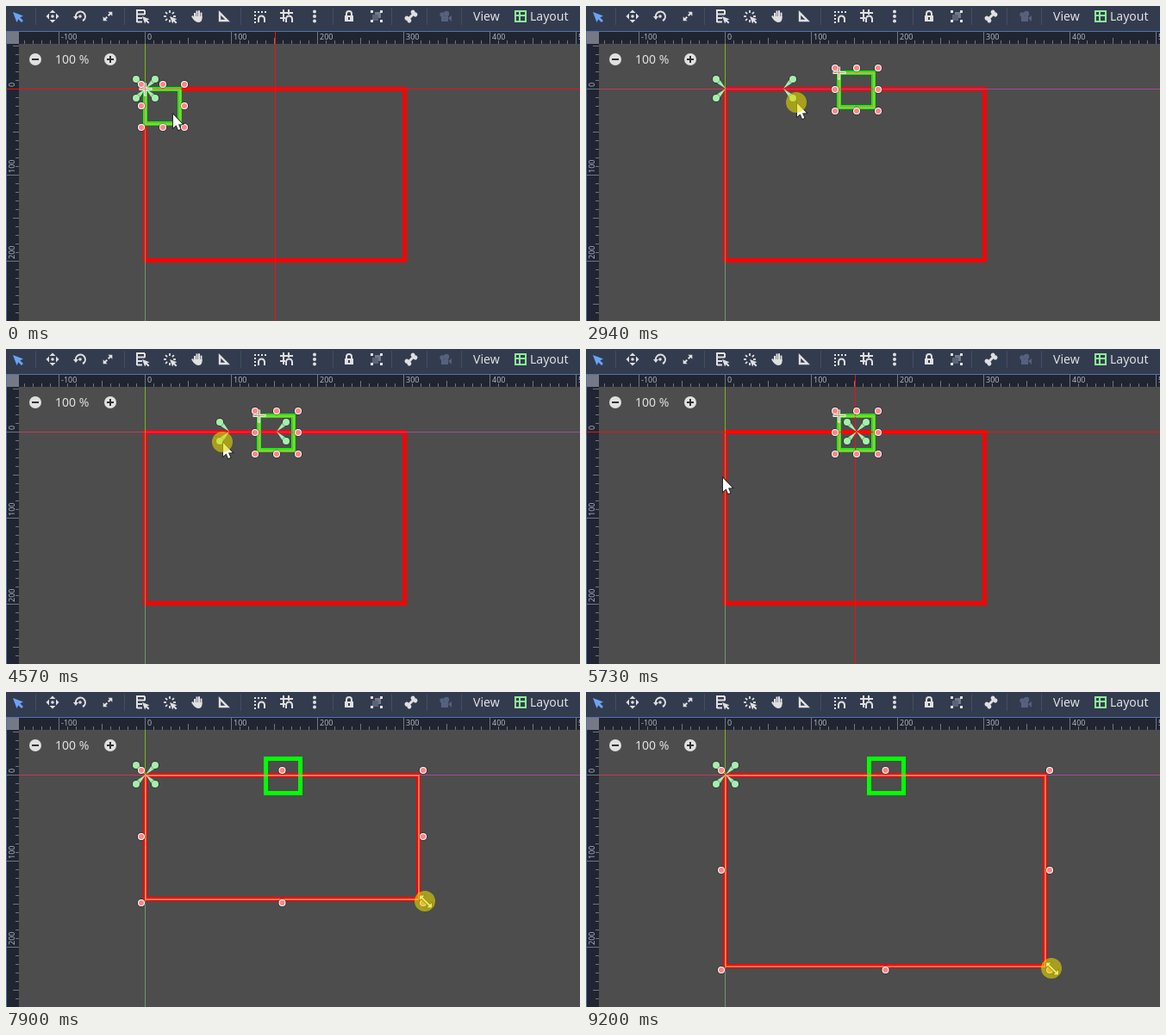
An HTML page with a canvas for the animation above (9300 ms loop, 666 px wide and 366 px high).

```html
<!DOCTYPE html>
<html lang="en">
<head>
<meta charset="utf-8">
<title>Anchor editing</title>
<style>
html, body { margin: 0; width: 100%; height: 100%; overflow: hidden; background: #4d4d4d; }
canvas { display: block; }
</style>
</head>
<body>
<canvas id="stage" width="666" height="366"></canvas>
<script>
const ctx = document.getElementById('stage').getContext('2d');
const W = 666, H = 366, LOOP = 9300, STEP = 76.7;
const ORIGIN = { x: 161.5, y: 96.5 };
const LIGHT = '#e0e0e0', DIM = '#56617f', PIN = '#a5efac';

// Pointer moves: start, end, target x, target y. The pointer rests in between.
const MOVES = [
  [80, 150, 187, 122],
  [860, 1320, 306, 106], [1390, 1470, 322, 104],
  [1780, 1930, 319, 103],
  [2250, 2560, 174, 108],
  [2790, 2940, 245, 113], [3020, 3330, 328, 109],
  [3630, 3940, 155, 110],
  [4110, 4870, 308, 109],
  [5420, 6200, -20, 200],
  [6500, 6810, 463, 299],
  [7040, 7200, 471, 299],
  [7520, 7900, 487, 244], [7980, 8440, 526, 338],
  [8510, 9200, 541, 322]
];
const PRESSES = [[860, 2250], [2790, 3630], [4110, 5270], [7350, LOOP]];

const clamp = (v, lo, hi) => Math.max(lo, Math.min(hi, v));
const within = (t, a, b) => t >= a && t < b;

function pointer(t) {
  let x = 194, y = 126;
  for (const [start, end, toX, toY] of MOVES) {
    if (t < start) break;
    const steps = Math.round((end - start) / STEP) + 1;
    const u = Math.min(1, Math.floor((t - start) / STEP + 1.15) / steps);
    x += (toX - x) * u;
    y += (toY - y) * u;
  }
  return { x: Math.round(x), y: Math.round(y) };
}

function ink(color) {
  ctx.fillStyle = ctx.strokeStyle = color;
}
function box(color, x, y, w, h) {
  ink(color);
  ctx.fillRect(x, y, w, h);
}
function frame(color, width, x, y, w, h) {
  ink(color);
  ctx.lineWidth = width;
  ctx.strokeRect(x, y, w, h);
}
function dot(x, y, radius) {
  ctx.beginPath();
  ctx.arc(x, y, radius, 0, 7);
  ctx.fill();
}
function disc(color, x, y, radius) {
  ink(color);
  dot(x, y, radius);
}
function fill(d) {
  ctx.fill(new Path2D(d));
}
function line(d, width = 2) {
  ctx.lineWidth = width;
  ctx.stroke(new Path2D(d));
}
function at(x, y, drawIt, angle = 0, scale = 1) {
  ctx.save();
  ctx.translate(x, y);
  ctx.rotate(angle);
  ctx.scale(scale, scale);
  drawIt();
  ctx.restore();
}
function spin(count, drawIt, offset = 0) {
  for (let i = 0; i < count; i++) at(0, 0, drawIt, offset + i * 2 * Math.PI / count);
}
function text(str, x, y, size, color) {
  ctx.font = `${size}px "Noto Sans", sans-serif`;
  ink(color);
  ctx.fillText(str, x, y);
}

const arrowHead = () => fill('M-3.5-4 0-7.5 3.5-4Z');
const stemArrow = () => { arrowHead(); line('M0-1V-5'); };
const selectArrow = () => fill('M0 0 12 4.5 7 7 4.5 12ZM5 7 7 5 12 10 10 12Z');
const smallArrow = () => at(0, 0, selectArrow, 0, 0.7);
const magnet = () => line('M-1 7V3A3 3 0 0 1 6 3V7');

// Toolbar icons, drawn around their centre.
const ICONS = [
  [14, () => at(-6, -5, selectArrow), '#6ba4f5'],
  [54, () => { spin(4, arrowHead); dot(0, 0, 1.8); }],
  [86, () => { line('M-5 1A5.5 5.5 0 1 1 3 5'); fill('M-8 0H-2L-5 4Z'); dot(0, 0, 1.8); }],
  [118, () => spin(2, stemArrow, Math.PI / 4)],
  [158, () => {
    line('M-6-8V7M3-7V-2');
    for (let y = -7; y < 8; y += 4.5) line(`M-6 ${y}H${y < 0 ? 3 : 0}`);
    smallArrow();
  }],
  [190, () => { spin(8, () => line('M0-4V-7', 1.8)); smallArrow(); }],
  [222, () => {
    for (let i = 0; i < 4; i++) line(`M${i * 2.5 - 3} 2V${-4 - 3 * Math.sin(i)}`);
    fill('M-4 0H5.5V3Q5 7 1 7-3 7-7 0L-5-1-4 1Z');
  }],
  [253, () => line('M-5-4V5H4Z', 2.4)],
  [294, () => {
    for (let i = -6; i < 7; i += 4) { ctx.fillRect(-6, i, 2, 2); ctx.fillRect(i, -6, 2, 2); }
    magnet();
  }],
  [326, () => {
    for (const p of [-4, 2]) line(`M${p}-8V${p < 0 ? 6 : -2}M-8 ${p}H${p < 0 ? 7 : -2}`);
    magnet();
  }],
  [358, () => { for (const y of [-5.5, 0, 5.5]) dot(0, y, 2); }],
  [398, () => { ctx.fillRect(-5, -1, 10, 7); line('M-3 0V-3A3 3 0 0 1 3-3V0'); box('#333b4f', -1, 1, 2, 3); }],
  [430, () => {
    box('#747a8a', -2, -5, 7, 7);
    box('#5c6375', -5, -2, 7, 7);
    ink(LIGHT);
    spin(4, () => ctx.fillRect(4, 4, 3, 3));
  }],
  [470, () => at(0, 0, () => {
    line('M0-5V5', 3);
    for (const x of [-2, 2]) for (const y of [-5, 5]) dot(x, y, 2.5);
  }, Math.PI / 4)],
  [510, () => { ctx.fillRect(-5, 0, 8, 6); dot(-4, -2, 2.7); dot(1, -3, 3.2); fill('M3 2 7-1V6Z'); }, DIM],
  [597, () => { ctx.lineWidth = 2; ctx.strokeRect(-6, -6, 12, 12); line('M-1-6V6M-6-1H6'); }, '#8eef97']
];

function drawRulers() {
  const tick = '#717682', label = '#b0b3bb';
  box('#202531', 0, 30, W, 14);
  box('#202531', 0, 30, 15, H);
  for (let n = -140; n <= 500; n += 10) {
    const size = n % 100 === 0 ? 14 : n % 50 === 0 ? 7 : 4;
    const x = 161 + n, y = 96 + n;
    if (x > 15) box(tick, x, 44 - size, 1, size);
    if (y > 44) box(tick, 15 - size, y, size, 1);
    if (n % 100 === 0) {
      text(n, x + 3, 39, 9, label);
      if (y > 44) at(10, y - 2, () => text(n, 0, 0, 9, label), -Math.PI / 2);
    }
  }
  box('#747985', 1, 30, 14, 14);
}

function drawChrome(focused) {
  box('#333b4f', 0, 0, W, 30);
  for (const x of [34, 137, 272, 379, 447, 488, 528]) box('#454d62', x, 2, 1, 20);
  for (const [x, icon, color = LIGHT] of ICONS) {
    ink(color);
    at(x, 12, icon);
  }
  text('View', 542, 17, 14, LIGHT);
  text('Layout', 608, 17, 14, LIGHT);
  drawRulers();
  if (focused) frame('#4f74ad', 1, 0.5, 29.5, W + 9, H);

  for (const x of [34, 121]) {
    disc(LIGHT, x, 62, 7);
    box('#333', x - 4, 61, 8, 2);
  }
  box('#333', 120, 58, 2, 8);
  text('100 %', 57, 67, 14, LIGHT);
}

function drawAxes() {
  const area = 'rgba(102,102,255,.4)';
  box('rgba(245,51,82,.75)', 0, 96, W, 1);
  box('rgba(135,214,3,.75)', 161, 0, 1, H);
  box(area, 161, 96, W, 1);
  box(area, 161, 96, 1, H);
}

function drawPins(left, right) {
  for (const [x, sx] of [[left, -1], [right, 1]]) for (const sy of [-1, 1]) {
    ink(PIN);
    fill(`M${x} 96l${sx * 8} ${sy * 12} ${sx * 4} ${sy * -4}Z`);
    disc('rgba(0,0,0,.3)', x + sx * 11, 96 + sy * 11, 5);
    disc(PIN, x + sx * 11, 96 + sy * 11, 4);
  }
}

function drawHandles({ x, y, w, h }) {
  for (const i of [-1, 0, 1]) for (const j of [-1, 0, 1]) {
    if (!i && !j) continue;
    const hx = x + 0.5 + w * (i + 1) / 2 + i * 5;
    const hy = y - 0.5 + h * (j + 1) / 2 + j * 5;
    disc('rgba(0,0,0,.3)', hx, hy, 5);
    disc('#fff', hx, hy, 4);
    disc('#ff8484', hx, hy, 3);
  }
}

function drawPivot({ x, y }) {
  at(x, y, () => {
    ink('#fff0e8');
    line('M-7 0H8M0-7V8', 3);
    ink('#c09a80');
    line('M-6 0H7M0-6V7', 1);
  });
}

function outlined(d) {
  ink('#222');
  line(d, 1.8);
  ink('#fff');
  fill(d);
}
const ARROW = 'M0 0V15.5L3.6 12.4 6 18 8.4 17 6 11.5 10.8 11.2Z';
const DOUBLE = 'M0-10 4-6H1V6H4L0 10-4 6H-1V-6H-4Z';

function drawPointer(t, { x, y }) {
  if (within(t, 860, 2250)) {
    at(x, y, () => { outlined(DOUBLE); at(0, 0, () => outlined(DOUBLE), Math.PI / 2); });
  } else if (t >= 7520) at(x, y - 0.5, () => outlined(DOUBLE), -Math.PI / 4);
  else at(x, y, () => outlined(ARROW));
  if (PRESSES.some(([a, b]) => within(t, a, b))) disc('rgba(228,215,0,.6)', x - 1, y - 1, 12);
}

function draw(t) {
  const tip = pointer(t);
  const moved = pointer(clamp(t, 150, 1930));
  const sized = pointer(clamp(t, 7200, 9200));
  const snap = x => x > 304 ? 314 : Math.max(162, x);
  const panel = { ...ORIGIN, w: sized.x - 170, h: sized.y - 100 };
  const square = {
    x: ORIGIN.x + moved.x - 187 + Math.round((panel.w - 301) / 2),
    y: ORIGIN.y + moved.y - 122, w: 40, h: 40
  };
  const panelSelected = t >= 6270;
  const selected = panelSelected ? panel : square;
  const guides = t < 860 || within(t, 3330, 4110) || within(t, 4870, 6500);
  const fading = within(t, 6500, 7520);

  box('#4d4d4d', 0, 0, W, H);
  for (const [color, r] of [['#f00', panel], ['#0f0', square]]) frame(color, 5, r.x, r.y, r.w, r.h);
  drawAxes();
  drawChrome(tip.x >= 0);

  if (guides || fading) box('#f01010', 0, 96, W, 1);
  if (guides) box('#f01010', 312, 30, 1, H);
  if (fading) box('#5a4848', 313, 44, 1, H);

  frame('rgba(255,153,102,.75)', 2, selected.x + 0.5, selected.y + 0.5, selected.w, selected.h);
  if (panelSelected) drawPins(162, 162);
  else {
    drawPins(snap(pointer(clamp(t, 3940, 4870)).x + 7), snap(pointer(clamp(t, 2560, 3330)).x - 16));
    drawPivot(square);
  }
  drawHandles(selected);
  drawPointer(t, tip);
}

function tick() {
  draw(performance.now() % LOOP);
  requestAnimationFrame(tick);
}
tick();
</script>
</body>
</html>
```
